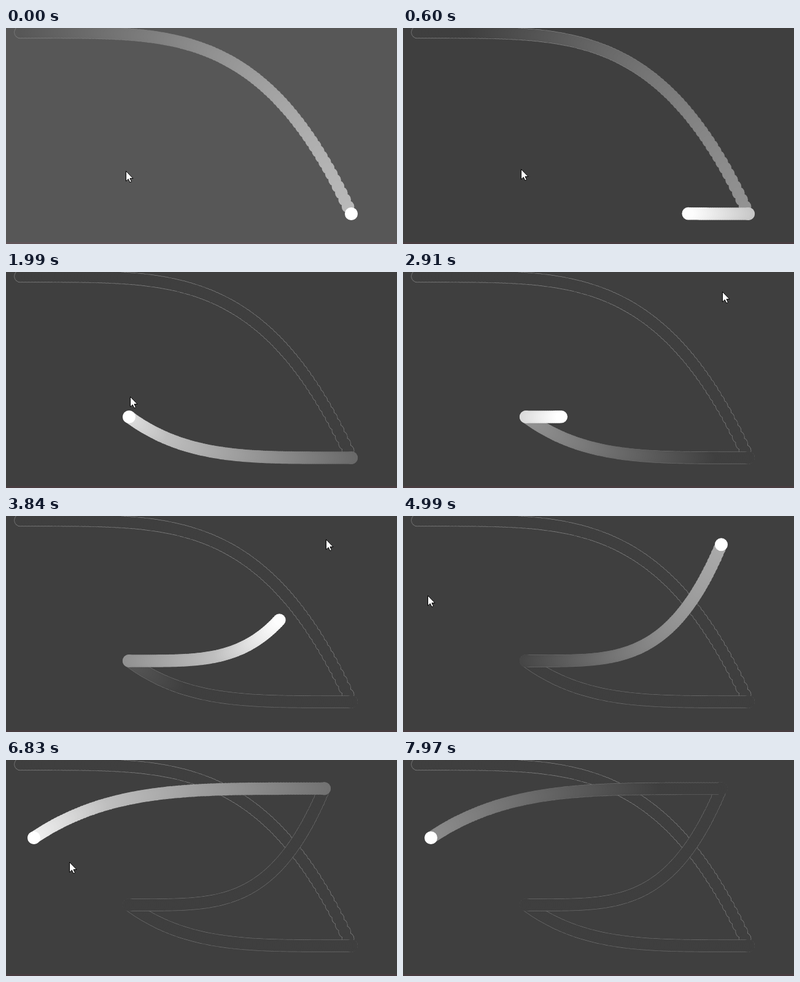
An HTML page with a canvas for the animation above (8 s loop, 637x354 px).

```html
<!DOCTYPE html>
<html lang="en">
<head>
<meta charset="utf-8">
<title>Ball with fading trail</title>
<style>
html, body { margin: 0; width: 100%; height: 100%; overflow: hidden; background: #3f3f3f; }
canvas { display: block; }
</style>
</head>
<body>
<canvas id="stage" width="637" height="354"></canvas>
<script>
const ctx = document.getElementById('stage').getContext('2d');
const LOOP = 8000, TICK = 15.4, STEPS = 100, FLOOR = 63;
const FIRST_UPDATE = 140, UPDATE_GAP = 76.75;
const BALL_R = 10.5, TRAIL_R = 9.6, EDGE_R = 10.3;

// The ball goes from each stop to the next; leave is when it sets off.
const stops = [
  { x: 23.5, y: 7, leave: -2115 },
  { x: 562.5, y: 304.5, leave: 172 },
  { x: 200.5, y: 237.5, leave: 2623 },
  { x: 518.5, y: 46.8, leave: 5144 },
  { x: 45.5, y: 127.5, leave: Infinity }
];

// Turning points of the pointer: time, x, y.
const turns = [
  [0, 196, 235], [1138, 190, 229], [1750, 180, 221], [1982, 203, 205],
  [2480, 521, 29], [3500, 522, 39], [4300, 522, 39], [4975, 41, 131],
  [5500, 29, 122], [6050, 41, 131], [6750, 92, 162], [7290, 365, 305],
  [7740, 364, 326], [7968, 352, 239]
];
const arrow = new Path2D('M0 0V16.5L3.8 13L6.4 18.5L9 17.3L6.5 12H11.5Z');

const gray = v => `rgb(${v},${v},${v})`;
const mix = (a, b, k) => a + (b - a) * k;
const smooth = k => k * k * (3 - 2 * k);

// The picture is refreshed at a steady, slow rate.
function heldTime(t) {
  const count = Math.floor((t - FIRST_UPDATE) / UPDATE_GAP);
  return Math.max(0, FIRST_UPDATE + count * UPDATE_GAP);
}

// Two levels per tick while bright, then one per tick.
function fade(age, floor) {
  const v = age < 32 ? 255 - 2 * age : 223 - age;
  return gray(Math.round(Math.max(floor, v)));
}

function disc(x, y, r, color) {
  ctx.fillStyle = color;
  ctx.beginPath();
  ctx.arc(x, y, r, 0, 2 * Math.PI);
  ctx.fill();
}

// Linear across, quartic ease-in down.
function drawTrail(from, to, ticks, r, floor) {
  const last = Math.min(STEPS, Math.floor(ticks));
  for (let i = 0; i <= last; i++) {
    const u = i / STEPS;
    disc(mix(from.x, to.x, u), mix(from.y, to.y, u ** 4), r, fade(ticks - i, floor));
  }
}

function drawMove(n, t, base) {
  const from = stops[n], to = stops[n + 1];
  const ticks = (t - from.leave) / TICK;
  if (ticks < 0) return;
  drawTrail(from, to, ticks, EDGE_R, n ? 108 : 128);
  if (n) disc(from.x, from.y, BALL_R + 0.1, fade(ticks, base));
  drawTrail(from, to, ticks, TRAIL_R, base);
  if (ticks >= STEPS && t < to.leave) disc(to.x, to.y, BALL_R, '#fff');
}

function drawPointer(t) {
  const i = Math.max(1, turns.findIndex(turn => turn[0] >= t));
  const [t0, x0, y0] = turns[i - 1], [t1, x1, y1] = turns[i];
  const k = smooth((t - t0) / (t1 - t0));
  ctx.save();
  ctx.translate(Math.round(mix(x0, x1, k)) - 0.5, Math.round(mix(y0, y1, k)) - 0.5);
  ctx.fillStyle = '#fff';
  ctx.strokeStyle = '#000';
  ctx.fill(arrow);
  ctx.stroke(arrow);
  ctx.restore();
}

function draw(t) {
  const base = Math.round(Math.max(FLOOR, 87 - t / TICK));
  ctx.fillStyle = gray(base);
  ctx.fillRect(0, 0, 637, 354);
  for (let n = 0; n < stops.length - 1; n++) drawMove(n, t, base);
  ctx.fillStyle = `rgb(${base + 10},${base - 3},${base + 1})`;
  ctx.fillRect(0, 351, 637, 3);
  drawPointer(t);
}

const origin = performance.now();
function loop() {
  draw(heldTime((performance.now() - origin) % LOOP));
  requestAnimationFrame(loop);
}
loop();
</script>
</body>
</html>
```
